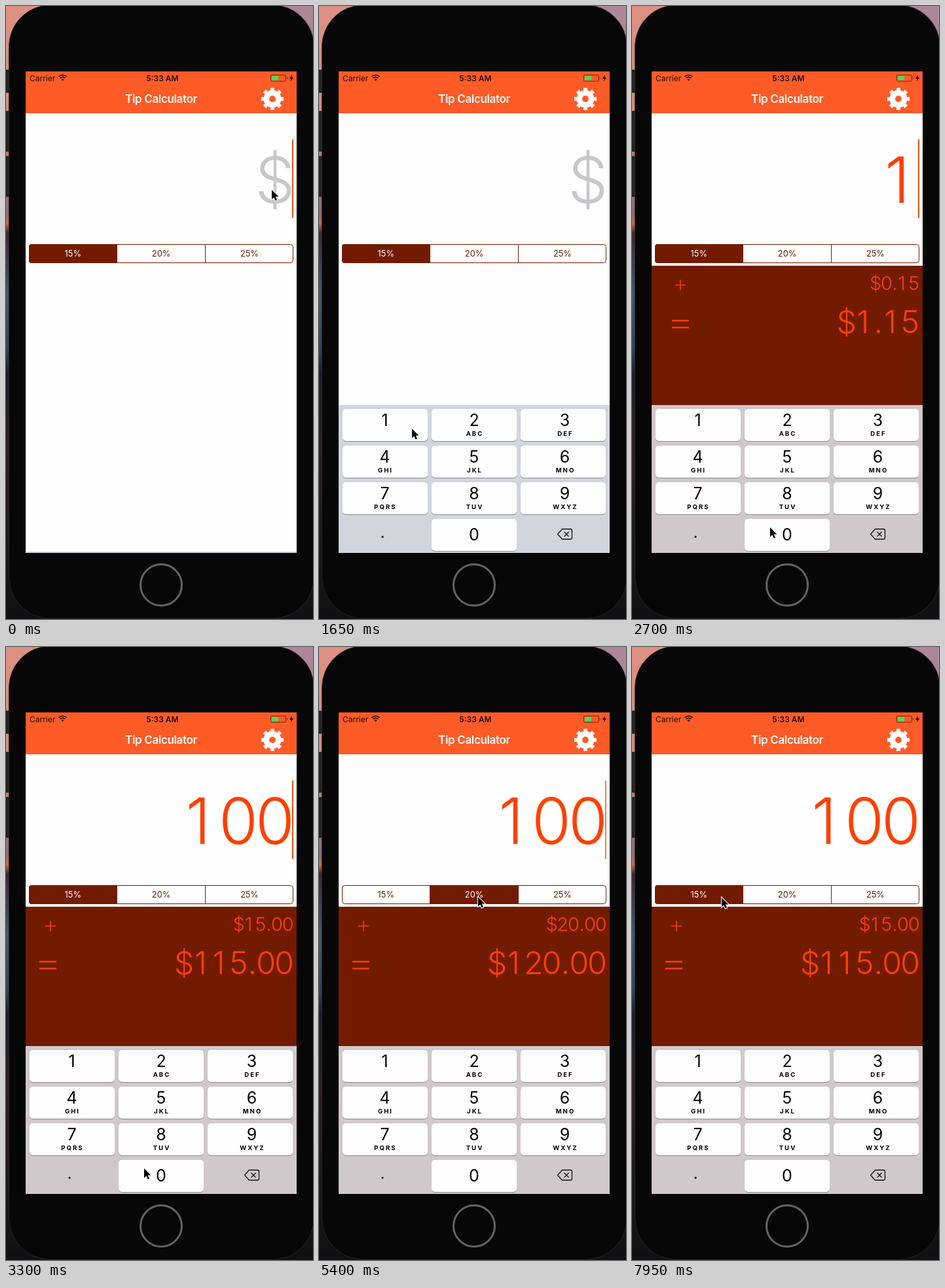
Recreate the animation shown at these times as an HTML page. Size 469 by 937 pixels, loop 8 s.

```html
<!DOCTYPE html>
<html lang="en">
<head>
<meta charset="utf-8">
<title>Tip Calculator</title>
<style>
  html, body { margin: 0; width: 100%; height: 100%; overflow: hidden; background: #111; }
  svg { display: block; width: 469px; height: 937px; font-family: Inter, Roboto, sans-serif; }
  text { text-anchor: middle; }
  .num { font-weight: 300; fill: #ff4000; }
  .digit { font-size: 25px; }
  .abc { font-size: 9.6px; font-weight: 700; letter-spacing: 2px; }
  .seg { font-size: 12.8px; }
</style>
</head>
<body>
<svg viewBox="0 0 469 937">
  <defs>
    <linearGradient id="side" x2="0" y2="1">
      <stop offset="0" stop-color="#dd9083"/>
      <stop offset=".2" stop-color="#d48a78"/>
      <stop offset=".27" stop-color="#a8707a"/>
      <stop offset=".34" stop-color="#8f6a76"/>
      <stop offset=".355" stop-color="#d0683a"/>
      <stop offset=".37" stop-color="#3a2a30"/>
      <stop offset=".47" stop-color="#46566c"/>
      <stop offset=".56" stop-color="#35435a"/>
      <stop offset=".6" stop-color="#1c1e28"/>
      <stop offset=".72" stop-color="#2c2223"/>
      <stop offset="1" stop-color="#101012"/>
    </linearGradient>
    <linearGradient id="sky">
      <stop offset=".1" stop-color="#b18b97" stop-opacity="0"/>
      <stop offset=".9" stop-color="#ad8797"/>
    </linearGradient>
    <clipPath id="screen"><rect x="30" y="100" width="414" height="736"/></clipPath>
    <clipPath id="pill"><rect x="35" y="364" width="404" height="29" rx="4"/></clipPath>
  </defs>

  <!-- desktop and phone body -->
  <rect width="469" height="937" fill="url(#side)"/>
  <rect width="469" height="80" fill="url(#sky)"/>
  <path d="M0 98h5v34h-5zM0 161h5v61h-5zM0 230h5v61h-5z" fill="#242424" stroke="#111"/>
  <rect x="4.5" y="-1.5" width="466" height="938" rx="64" fill="#070707" stroke="#242424"/>
  <circle cx="237" cy="885" r="31.5" fill="none" stroke="#636363" stroke-width="3"/>

  <g clip-path="url(#screen)">
    <rect x="30" y="100" width="414" height="736" fill="#fefefe"/>

    <!-- status and title bar -->
    <rect x="30" y="100" width="414" height="64" fill="#ff5b26"/>
    <g fill="#1d0d06">
      <text x="36" y="115" font-size="12" style="text-anchor:start">Carrier</text>
      <text x="239" y="115" font-size="12" font-weight="600">5:33 AM</text>
      <path d="M80.5 108a8.5 8.5 0 0 1 12 0M82.6 110.1a5.5 5.5 0 0 1 7.8 0" fill="none" stroke="#1d0d06" stroke-width="1.7"/>
      <path d="M84.3 112.1a3.1 3.1 0 0 1 4.4 0l-2.2 2.4z"/>
      <rect x="404.5" y="105.5" width="23" height="9.5" rx="1.5" fill="none" stroke="#6b2a14"/>
      <path d="M429 108.5q1.6 1.7 0 3.4z"/>
      <rect x="406" y="107" width="10" height="6.5" fill="#4cd964"/>
      <path d="M437 105l-4 6h2.6l-1 4.5 4.6-6.3h-2.8z"/>
    </g>
    <text x="237" y="148" font-size="17" font-weight="600" letter-spacing="-.35" fill="#fff">Tip Calculator</text>
    <g transform="translate(407 142)" fill="none" stroke="#fff">
      <circle r="9.2" stroke-width="8.6"/>
      <circle r="14.6" stroke-width="5" pathLength="8" stroke-dasharray=".5 .5" stroke-dashoffset=".25" transform="rotate(22.5) rotate(-22.5)"/>
    </g>

    <!-- amount -->
    <text id="amount" class="num" font-size="97" y="301"></text>
    <rect id="caret" x="437" y="204" width="2" height="120" fill="#f4500f"/>

    <!-- tip choice -->
    <g id="choice" clip-path="url(#pill)"></g>
    <path d="M169.5 364v29M304.5 364v29" stroke="#731b00"/>
    <rect x="35.5" y="364.5" width="403" height="28" rx="4" fill="none" stroke="#731b00"/>

    <!-- result panel -->
    <g id="panel">
      <rect x="30" y="397" width="414" height="439" fill="#731b00"/>
      <path id="plus" d="M66 426.5h16M74 418.5v16" stroke="#ff4000" stroke-width="1.6"/>
      <path id="equal" d="M61 481h26M61 491.500h26" stroke="#ff4000" stroke-width="2.4"/>
      <text id="tip" class="num" font-size="29" y="434"></text>
      <text id="total" class="num" font-size="48.5" y="500"></text>
    </g>

    <!-- keyboard -->
    <g id="keyboard">
      <rect x="30" y="610" width="414" height="226" fill="#d2d5db"/>
      <rect id="tint" x="30" y="610" width="414" height="226" fill="#d0c9cb"/>
      <g id="keys"></g>
      <text x="97" y="813" class="digit">.</text>
      <path d="M371.500 799.500h12.500q2.500 0 2.500 2.500v10.500q0 2.500-2.500 2.500h-12.500l-7-7.750zM374.500 803.700l7.200 7.200M381.700 803.700l-7.200 7.200" fill="none" stroke="#111" stroke-width="1.3" stroke-linejoin="round"/>
    </g>
  </g>

  <path id="cursor" d="M0 0V14.500L3.300 11.400L5.600 16.600L8 15.500L5.800 10.500H10.400Z" stroke="#fff" style="paint-order:stroke" stroke-width="2"/>
</svg>
<script>
const LOOP = 8000, STEP = 150;
const $ = id => document.getElementById(id);
const clamp = v => Math.max(0, Math.min(1, v));
const ease = p => p < .5 ? 2 * p * p : 1 - 2 * (1 - p) ** 2;

// Pointer path: time, x, y
const path = [
  [450, 406, 281], [750, 352, 400], [1050, 222, 600], [1350, 150, 652], [1500, 143, 652], [1650, 142, 646],
  [2100, 142, 646], [2250, 165, 695], [2400, 193, 753], [2550, 205, 782], [2700, 211, 797],
  [4350, 211, 797], [4500, 222, 735], [4650, 248, 560], [4800, 264, 410], [5100, 243, 382],
  [5400, 243, 382], [5700, 300, 384], [6150, 359, 381],
  [6900, 359, 381], [7050, 340, 385], [7350, 220, 388], [7650, 137, 383]
];

const letters = ["", "ABC", "DEF", "GHI", "JKL", "MNO", "PQRS", "TUV", "WXYZ"];
const centers = [100.5, 237, 375.5];

function keyMarkup(label, col, row, abc) {
  const x = 36 + 136 * col, y = 616 + 56 * row, cx = centers[col];
  return `<rect x="${x}" y="${y + 1}" width="130" height="49" rx="5" fill="#898b90"/>
    <rect id="key${label}" x="${x}" y="${y}" width="130" height="49" rx="5"/>
    <text class="digit" x="${cx}" y="${y + (abc === undefined ? 32.5 : 26)}">${label}</text>
    <text class="abc" x="${cx + 1}" y="${y + 41}">${abc || ""}</text>`;
}
$("keys").innerHTML = letters.map((abc, i) => keyMarkup(i + 1, i % 3, Math.floor(i / 3), abc)).join("")
  + keyMarkup(0, 1, 3);

const rates = [15, 20, 25];
$("choice").innerHTML = rates.map((r, i) =>
  `<rect id="seg${r}" x="${35 + 134.7 * i}" y="364" width="134.700" height="29" fill="#731b00"/>
   <text id="rate${r}" class="seg" x="${102.3 + 134.8 * i}" y="383">${r}%</text>`).join("");

// Right-aligned figures on an even pitch
function setNumber(id, str, em) {
  const el = $(id);
  let right = 439;
  const xs = [...str].reverse().map(c => {
    const w = em * (c === "." ? .278 : .556);
    right -= w;
    return right + w / 2 - (c === "1" ? .055 * em : 0);
  });
  el.textContent = str;
  el.setAttribute("x", xs.reverse().join(" "));
}

function pointer(t) {
  const i = path.findIndex(p => p[0] > t);
  if (i === 0) return path[0].slice(1);
  if (i < 0) return path[path.length - 1].slice(1);
  const [a, b] = [path[i - 1], path[i]], k = (t - a[0]) / (b[0] - a[0]);
  return [a[1] + (b[1] - a[1]) * k, a[2] + (b[2] - a[2]) * k];
}

function caretAlpha(t) {
  if (t >= 2100 && t < 3870) return 1;
  const start = t < 2100 ? 425 : 3870;
  if (t < start) return 1;
  const u = (t - start) % 985;
  return u < 450 ? 1 - clamp(u / 130) : clamp((u - 435) / 150);
}

function render(t) {
  const amount = t < 2100 ? 0 : t < 3150 ? 1 : t < 3300 ? 10 : 100;
  const rate = t < 5400 ? 15 : t < 6450 ? 20 : t < 7950 ? 25 : 15;
  const held = t === 5250 ? 20 : t === 6300 ? 25 : t === 7800 ? 15 : 0;
  const shown = ease(clamp((t - 2280) / 400));

  setNumber("amount", amount ? String(amount) : "$", 100.7);
  $("amount").style.fill = amount ? "#ff4000" : "#c7c7cc";
  $("caret").style.opacity = caretAlpha(t);

  for (const r of rates) {
    const on = r === rate;
    $("seg" + r).style.opacity = on ? 1 : r === held ? .15 : 0;
    $("rate" + r).style.fill = on ? "#fff" : "#731b00";
    $("rate" + r).style.opacity = r === held ? .75 : 1;
  }

  const tip = amount * rate / 100;
  setNumber("tip", "$" + tip.toFixed(2), 30);
  setNumber("total", "$" + (amount + tip).toFixed(2), 50);
  $("plus").setAttribute("transform", `translate(${amount === 100 ? -6 : 0})`);
  $("equal").setAttribute("transform", `translate(${amount === 100 ? -10 : amount === 10 ? -5 : 0})`);
  $("panel").style.opacity = $("tint").style.opacity = shown;

  const rise = t < 150 ? 224 : t < 450 ? 35 : 0;
  $("keyboard").setAttribute("transform", `translate(0 ${rise})`);
  for (let i = 0; i < 10; i++) {
    const down = (i === 1 && t === 1950) || (i === 0 && t === 3000);
    $("key" + i).style.fill = down ? "#d2d5db" : "#fefefe";
  }

  $("cursor").setAttribute("transform", `translate(${pointer(t)})`);
}

function frame(now) {
  render(Math.floor(now % LOOP / STEP) * STEP);
  requestAnimationFrame(frame);
}
render(0);
requestAnimationFrame(frame);
</script>
</body>
</html>
```
